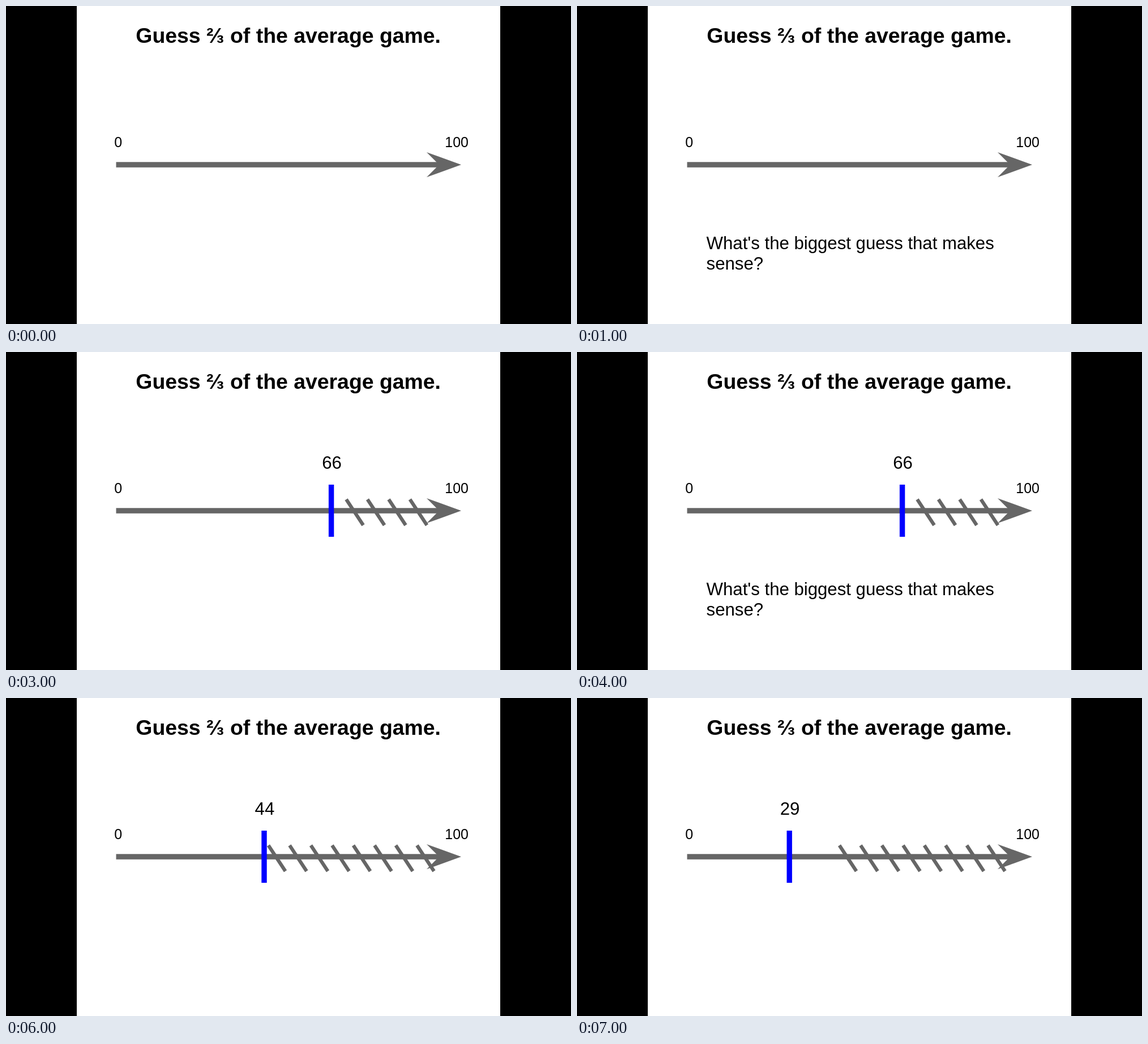
An HTML page for the animation above (8 s loop, 998 by 561 pixels).

```html
<!DOCTYPE html>
<html lang="en">
<head>
<meta charset="utf-8">
<title>Guess ⅔ of the average game</title>
<style>
  html, body { margin: 0; width: 100%; height: 100%; overflow: hidden; background: #000; }
  svg { display: block; width: 100vw; height: 100vh; font-family: "Liberation Sans", Arial, sans-serif; }
  text { fill: #000; white-space: pre; }
  .page { fill: #fff; }
  .title { font-size: 37.4px; font-weight: bold; }
  .label { font-size: 24.93px; }
  .body { font-size: 31.17px; }
  .head { fill: #666; }
  .shaft, .hatch { stroke: #666; fill: none; }
  .shaft { stroke-width: 9.4; }
  .hatch { stroke-width: 6.2; }
  .bar { stroke: #00f; stroke-width: 9.4; }
  .dark .page { fill: #000; }
  .dark text { fill: #050505; stroke: #0c0c0c; stroke-width: .8; }
  .dark .head { fill: #262626; }
  .dark .shaft { stroke: #262626; }
  .dark .bar { stroke: #1e1e1e; }
</style>
</head>
<body>
<svg id="stage" viewBox="0 0 998 561">
  <rect class="page" x="125" width="748" height="561"/>
  <g class="title">
    <text x="229.3" y="64.5">Guess</text>
    <text x="354" y="64.5">⅔</text>
    <text x="396" y="64.5">of the average game.</text>
  </g>
  <g class="label">
    <text x="191.2" y="248.6">0</text>
    <text x="775.3" y="248.6">100</text>
  </g>
  <path class="shaft" d="M194.5 280H767"/>
  <path class="head" d="M743 258L804 280L743 302L765 280Z"/>
  <path class="hatch" id="hatches"/>
  <g id="marker">
    <path class="bar" d="M0 234V326"/>
    <text class="body" id="value" x=".9" y="205.8" text-anchor="middle"></text>
  </g>
  <g class="body" id="question">
    <text x="228.6" y="429">What's the biggest guess that makes</text>
    <text x="228.6" y="464.8">sense?</text>
  </g>
</svg>
<script>
  const STEP = 1000;
  const $ = id => document.getElementById(id);
  const markerX = { 66: 574.6, 44: 456, 29: 375.2 };
  const hatchStart = { 4: 601, 8: 463.5 };

  const slides = [
    {},
    { question: true },
    { value: 66, dark: true },
    { value: 66, hatches: 4 },
    { value: 66, hatches: 4, question: true },
    { value: 44, hatches: 4, question: true },
    { value: 44, hatches: 8 },
    { value: 29, hatches: 8 },
  ];

  const show = (id, on) => $(id).setAttribute("visibility", on ? "visible" : "hidden");

  function hatchPath(count) {
    let d = "";
    for (let i = 0; i < count; i++) d += `M${hatchStart[count] + i * 37.5} 260l30 45.5`;
    return d;
  }

  function render({ value, hatches = 0, question, dark }) {
    $("stage").classList.toggle("dark", !!dark);
    show("question", question);
    show("marker", value);
    $("hatches").setAttribute("d", hatchPath(hatches));
    if (value) {
      $("marker").setAttribute("transform", `translate(${markerX[value]})`);
      $("value").textContent = value;
    }
  }

  const begin = performance.now();
  function tick() {
    const elapsed = performance.now() - begin;
    render(slides[Math.floor(elapsed / STEP) % slides.length]);
    requestAnimationFrame(tick);
  }
  tick();
</script>
</body>
</html>
```
